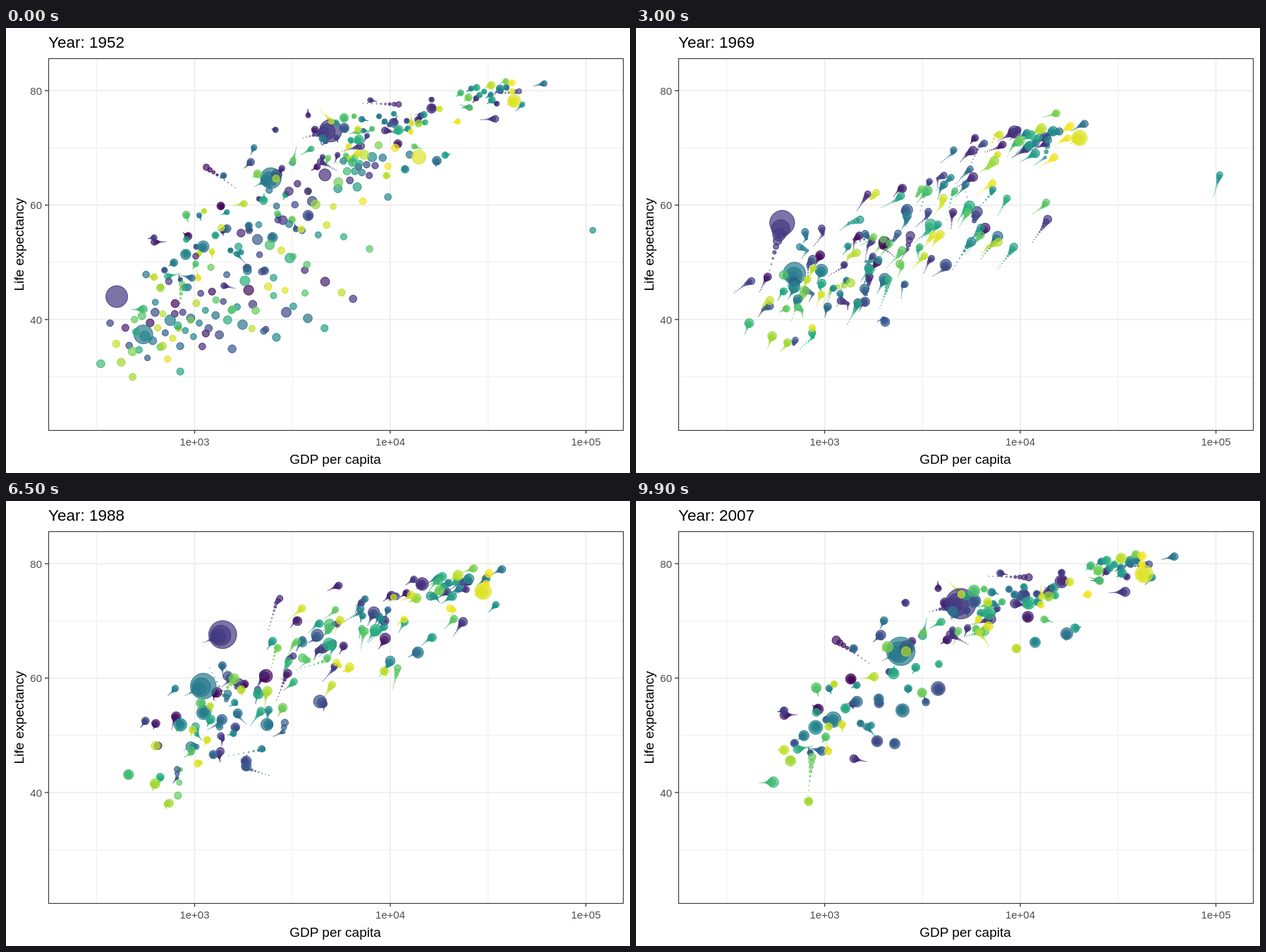
Animation of 885x632 px, one loop 10 s. Source, as an HTML page with a canvas:

```html
<!DOCTYPE html>
<html lang="en">
<head>
<meta charset="utf-8">
<title>Life expectancy and GDP</title>
<style>
html, body { margin: 0; width: 100%; height: 100%; overflow: hidden; background: #fff; }
canvas, svg { position: absolute; left: 0; top: 0; width: 885px; height: 632px; display: block; }
text { font-family: "Liberation Sans", Arial, sans-serif; font-size: 19px; fill: #000; }
.tick { font-size: 15px; fill: #4d4d4d; }
.title { font-size: 22.5px; }
.mid { text-anchor: middle; }
.end { text-anchor: end; }
</style>
</head>
<body>
<canvas id="plot" width="885" height="632"></canvas>
<svg viewBox="0 0 885 632">
  <text id="year" class="title" x="60" y="28">Year: 1952</text>
  <text class="mid" x="467" y="619">GDP per capita</text>
  <text class="mid" transform="translate(25 307.5) rotate(-90)">Life expectancy</text>
  <text class="tick end" x="51" y="94.5">80</text>
  <text class="tick end" x="51" y="257">60</text>
  <text class="tick end" x="51" y="419.5">40</text>
  <text class="tick mid" x="267.5" y="593">1e+03</text>
  <text class="tick mid" x="545" y="593">1e+04</text>
  <text class="tick mid" x="822.5" y="593">1e+05</text>
</svg>
<script>
const ctx = document.getElementById('plot').getContext('2d');
const yearText = document.getElementById('year');
const FRAMES = 100, STEP = 100, WAKE = 10, PERIOD = 9, LAST = 11;

const panel = { x: 60, y: 44, w: 815, h: 527 };
const xOf = log => 267.5 + 277.5 * (log - 3);
const yOf = life => 89 + (80 - life) * 8.125;
const mix = (a, b, t) => a + (b - a) * t;
const clamp = (v, lo, hi) => Math.max(lo, Math.min(hi, v));

// Linear interpolation through rows of [time, ...values]
function along(rows, t) {
  let i = 0;
  while (i < rows.length - 2 && t > rows[i + 1][0]) i++;
  const a = rows[i], b = rows[i + 1], u = (t - a[0]) / (b[0] - a[0]);
  return a.map((v, j) => mix(v, b[j], u));
}

let seed = 1952;
function rand() {
  seed = (Math.imul(seed, 1664525) + 1013904223) >>> 0;
  return seed / 4294967296;
}
const normal = () => (rand() + rand() + rand() + rand() - 2) * 1.73;
// Mostly small, now and then a large jump
const shock = () => 0.35 * normal() ** 3;
// Evenly spread bell curve, for u between 0 and 1
const bell = u => (u ** 0.135 - (1 - u) ** 0.135) / 0.1975;

const ramp = ['440154', '472d7b', '3b528b', '2c728e', '21918c', '28ae80', '5ec962', 'addc30', 'fde725']
  .map(h => [0, 2, 4].map(i => parseInt(h.slice(i, i + 2), 16)));
function viridis(v) {
  const p = v * 8, i = Math.min(7, Math.floor(p));
  return `rgb(${ramp[i].map((c, j) => Math.round(mix(c, ramp[i + 1][j], p - i)))})`;
}

const dots = [];
// rows: [five-year step, log10 gdp, life]; population in millions
function addDot(hue, pop, grow, rows) {
  const spots = [];
  for (let f = 0; f < FRAMES; f++) {
    const [t, log, life] = along(rows, f / PERIOD);
    const people = pop * mix(1, grow, t / LAST);
    spots.push({ x: xOf(log), y: yOf(life), size: 2 + 10 * Math.sqrt(people / 1319) });
  }
  dots.push({ hue, color: viridis(hue), spots });
}

// The few dots that stand out, as key points [step, gdp, life]
function addLead(hue, pop, grow, ...points) {
  addDot(hue, pop, grow, points.map(([t, gdp, life]) => [t, Math.log10(gdp), life]));
}
addLead(0.17, 556, 2.37, [0, 400, 44], [1, 576, 50.5], [2, 488, 44.5], [4, 677, 63.1],
  [8, 1656, 68.7], [11, 4959, 73]);
addLead(0.41, 372, 2.98, [0, 547, 37.4], [6, 856, 56.6], [11, 2452, 64.7]);
addLead(0.95, 158, 1.9, [0, 13990, 68.4], [5, 24073, 73.4], [11, 42952, 78.2]);
addLead(0.5, 0.2, 12, [0, 108382, 55.6], [2, 95458, 60.5], [4, 109348, 67.7],
  [6, 31354, 71.3], [11, 47307, 77.6]);
addLead(0.76, 2.5, 3.5, [0, 493, 40], [7, 848, 44], [8, 737, 23.6], [11, 863, 46.2]);

// A cloud drifts from its first to its last centre; bend sets how early it moves
function addCloud({ n, grow, bend, log, life, wide, tall }) {
  for (let i = 0; i < n; i++) {
    const a = bell((i + 0.5) / n);
    const b = bell(0.02 + 0.96 * ((i * 0.618034 + 0.3) % 1));
    const skew = 0.85 * a + 0.12 * (a * a - 1);
    const pop = Math.min(90, 4 * Math.exp(1.2 * normal()));
    const rows = [];
    let driftX = 0, driftY = 0;
    for (let k = 0; k <= LAST; k++) {
      const u = k / LAST, eased = 1 - (1 - u) ** bend;
      const height = mix(...tall, u);
      rows.push([
        k,
        mix(...log, eased) + wide * (skew + driftX),
        clamp(mix(...life, eased) + height * (0.5 * a + 0.8 * b + driftY), 29, 82.3)
      ]);
      driftX = 0.75 * driftX + 0.12 * shock();
      driftY = 0.75 * driftY + 0.2 * shock();
    }
    addDot(rand(), pop, grow, rows);
  }
}
[
  { n: 50, grow: 3.8, bend: 2, log: [2.97, 3.16], life: [39, 54], wide: 0.31, tall: [4.3, 7] },
  { n: 27, grow: 2.8, bend: 1.4, log: [3.15, 3.7], life: [46, 70.5], wide: 0.34, tall: [8, 4.5] },
  { n: 24, grow: 2.6, bend: 1.5, log: [3.5, 3.88], life: [53, 73.6], wide: 0.23, tall: [8, 2.8] },
  { n: 12, grow: 1.3, bend: 2.2, log: [3.55, 4.12], life: [61, 75], wide: 0.18, tall: [3.5, 1.7] },
  { n: 19, grow: 1.5, bend: 1.3, log: [3.88, 4.53], life: [67, 80], wide: 0.11, tall: [2.2, 1] },
  { n: 5, grow: 4, bend: 1.8, log: [3.6, 4.25], life: [40, 70], wide: 0.18, tall: [3, 4] }
].forEach(addCloud);
dots.sort((a, b) => a.hue - b.hue);

function line(x1, y1, x2, y2, color, width) {
  ctx.strokeStyle = color;
  ctx.lineWidth = width;
  ctx.beginPath();
  ctx.moveTo(x1, y1);
  ctx.lineTo(x2, y2);
  ctx.stroke();
}

function drawGrid() {
  const { x, y, w, h } = panel;
  const column = (log, width) => line(xOf(log), y, xOf(log), y + h, '#ebebeb', width);
  const row = (life, width) => line(x, yOf(life), x + w, yOf(life), '#ebebeb', width);
  ctx.globalAlpha = 1;
  ctx.fillStyle = '#fff';
  ctx.fillRect(0, 0, 885, 632);
  [2.5, 3.5, 4.5].forEach(v => column(v, 0.9));
  [70, 50, 30].forEach(v => row(v, 0.9));
  [3, 4, 5].forEach(v => column(v, 1.6));
  [80, 60, 40].forEach(v => row(v, 1.6));
}

function drawBorder() {
  const { x, y, w, h } = panel;
  ctx.globalAlpha = 1;
  ctx.strokeStyle = '#333';
  ctx.lineWidth = 1.1;
  ctx.strokeRect(x + 0.5, y - 0.5, w, h + 1);
  [3, 4, 5].forEach(v => line(xOf(v), y + h, xOf(v), y + h + 5, '#333', 1.3));
  [80, 60, 40].forEach(v => line(x - 5, yOf(v), x, yOf(v), '#333', 1.3));
}

function disc(x, y, r) {
  ctx.beginPath();
  ctx.arc(x, y, r, 0, Math.PI * 2);
}

function drawDots(frame, age) {
  const fall = (1 - age / WAKE) ** 3;
  const at = (frame - age + FRAMES) % FRAMES;
  ctx.globalAlpha = 0.7;
  ctx.lineWidth = 1;
  for (const { color, spots } of dots) {
    const { x, y, size } = spots[at], r = 1.778 * size * fall + 0.8;
    ctx.fillStyle = ctx.strokeStyle = color;
    disc(x, y, r);
    ctx.fill();
    if (r > 2) {
      disc(x, y, r - 0.5);
      ctx.stroke();
    }
  }
}

let shown = -1;
function tick() {
  const frame = Math.floor(performance.now() / STEP) % FRAMES;
  if (frame !== shown) {
    shown = frame;
    drawGrid();
    ctx.save();
    ctx.beginPath();
    ctx.rect(panel.x, panel.y, panel.w, panel.h);
    ctx.clip();
    for (let age = WAKE - 1; age >= 0; age--) drawDots(frame, age);
    ctx.restore();
    drawBorder();
    yearText.textContent = 'Year: ' + Math.round(1952 + frame * 5 / PERIOD);
  }
  requestAnimationFrame(tick);
}
tick();
</script>
</body>
</html>
```
